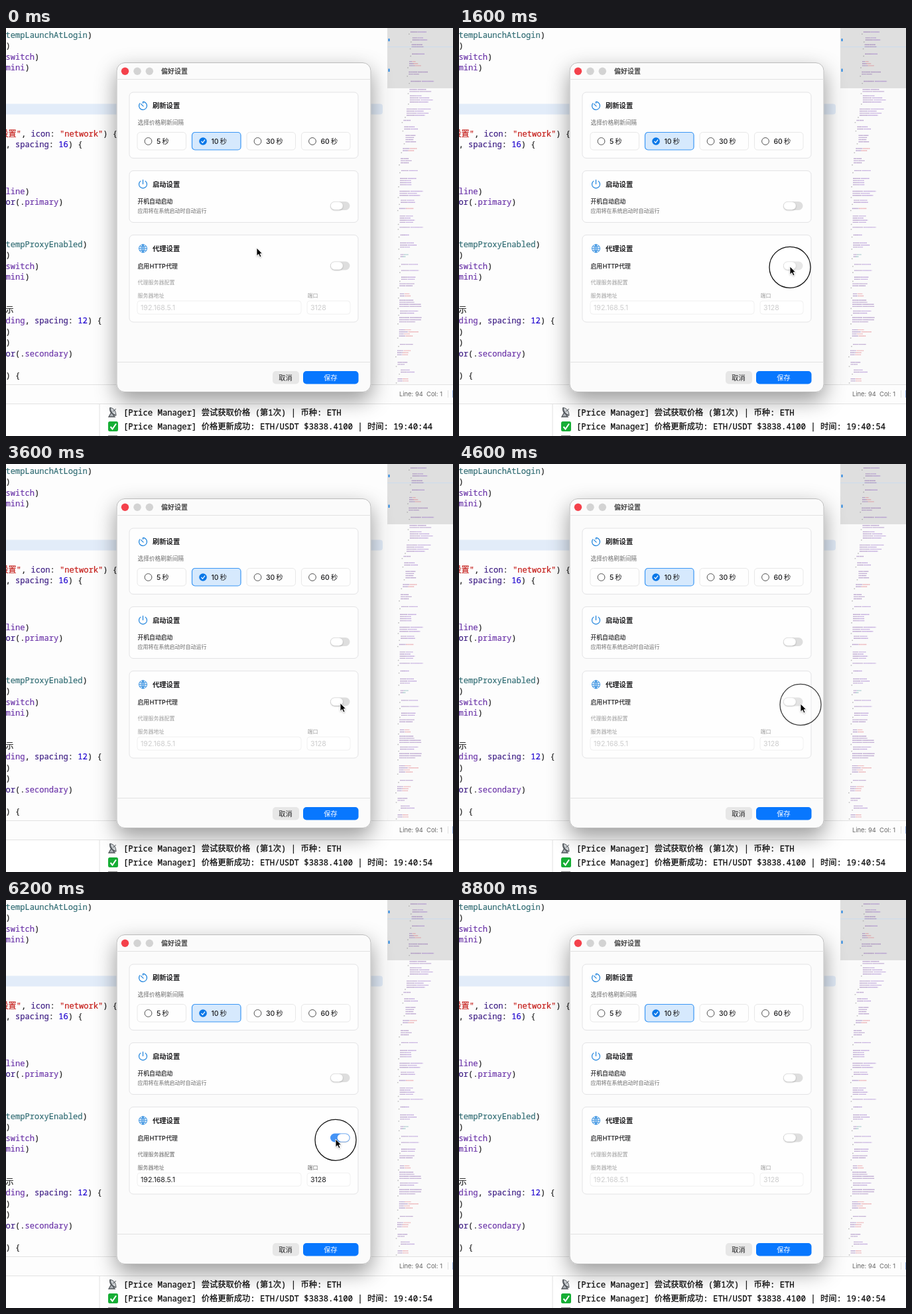
An HTML page for the animation above (8900 ms loop, 674 by 616 pixels).

```html
<!DOCTYPE html>
<html lang="zh-CN">
<head>
<meta charset="utf-8">
<style>
  html, body { margin: 0; width: 100%; height: 100%; overflow: hidden; background: #fff; }
  svg { display: block; width: 674px; height: 616px; }
  text { font-family: Inter, "Noto Sans CJK SC", "Noto Sans CJK", sans-serif; white-space: pre; fill: #1d1d1f; }
  .code text, .code tspan, .log text { fill: currentColor; stroke: currentColor; stroke-width: .2; }
  .code text, .log text { font-family: "Noto Sans Mono", "Noto Sans CJK SC", "DejaVu Sans Mono", monospace; }
  .code text { font-size: 12.1px; color: #222; }
  .log text { font-size: 12.28px; font-weight: 500; color: #111; stroke-width: .3; }
  .purple { color: #6c36a9; } .indigo { color: #3d1d84; } .teal { color: #326d74; }
  .red { color: #c41a16; } .blue { color: #1c00cf; }
  .rule { stroke: #e2e2e2; }
  .card { fill: #fefefe; stroke: #e3e3e5; }
  .field { fill: #fff; stroke: #f0f0f0; }
  .option { fill: #fefefe; stroke: #e8e8e8; }
  .option.on { fill: #d6e9fd; stroke: #3a97f5; stroke-width: 1.2; }
  .radio { fill: none; stroke: #555; }
  .icon { fill: none; stroke: #167fdc; stroke-linecap: round; }
  .title { font-size: 10.3px; font-weight: 700; }
  .choice { font-size: 10.5px; font-weight: 500; }
  .button { font-size: 10.2px; font-weight: 500; text-anchor: middle; }
  .label { font-size: 8.8px; font-weight: 500; stroke: #1d1d1f; stroke-width: .15; }
  .note { font-size: 8px; fill: #6b6b6b; }
  .value { font-size: 10.6px; }
</style>
</head>
<body>
<svg viewBox="0 0 674 616" xmlns="http://www.w3.org/2000/svg">
  <defs>
    <filter id="shadow" x="-25%" y="-20%" width="150%" height="145%">
      <feDropShadow dx="0" dy="12" stdDeviation="16" flood-opacity=".4"/>
    </filter>
    <filter id="soft" x="-50%" y="-50%" width="200%" height="200%">
      <feDropShadow dx="0" dy=".8" stdDeviation=".8" flood-opacity=".3"/>
    </filter>
  </defs>

  <!-- Editor -->
  <rect width="674" height="616" fill="#fdfdfd"/>
  <rect x="-8" y="114.5" width="576" height="16" rx="4" fill="#e2ecf9"/>
  <g class="code" id="code"></g>
  <rect x="574" width="100" height="538" fill="#fafafa"/>
  <rect x="575" width="99" height="91" fill="#dfdfdf"/>
  <path d="M575 28.5H674" stroke="#cbdcec"/>
  <path d="M577.5 16v4M577.5 61.5v4.5" stroke="#2486e4" stroke-width="2"/>
  <g id="minimap" stroke-width="1.4" stroke-dasharray="1.6 .6" opacity=".55"></g>

  <!-- Status bar and console -->
  <rect y="568" width="674" height="48" fill="#fff"/>
  <path class="rule" d="M0 538.5H674M0 567.5H674M141 568V616M666.5 547v11"/>
  <path d="M673.5 547v11" stroke="#9eb9e6"/>
  <text x="593" y="556" style="font-size:9.4px;fill:#666">Line: 94  Col: 1</text>
  <g class="log">
    <path d="M157 573q-2 9 9 12M155 587l4-7 5 7z" fill="#aeb3b8" stroke="#50555a" stroke-width="1.3"/>
    <path d="M157 573q9 2 9 12q-8-3-9-12M161 579l5-4" fill="#d1d5d8" stroke="#50555a"/>
    <text x="177" y="584.5">[Price Manager] 尝试获取价格 (第1次) | 币种: ETH</text>
    <rect x="154" y="594" width="15" height="15" rx="2.5" fill="#16ae35"/>
    <path d="M157.5 602l3 3.5 5.5-8" fill="none" stroke="#fff" stroke-width="2"/>
    <text x="177" y="606">[Price Manager] 价格更新成功: ETH/USDT $3838.4100 | 时间: <tspan id="stamp"></tspan></text>
    <rect x="154" y="615" width="14" height="1" fill="#888"/>
  </g>

  <!-- Preferences window -->
  <rect x="167" y="52.5" width="383" height="497" rx="12" fill="#fbfbfb" stroke="#bcbcbc" filter="url(#shadow)"/>
  <path class="rule" d="M167 77.5H550M167 504.5H550"/>
  <circle cx="179.5" cy="65.3" r="5.7" fill="#f4414b"/>
  <circle cx="198" cy="65.3" r="5.7" fill="#d3d3d3"/>
  <circle cx="216.3" cy="65.3" r="5.7" fill="#d3d3d3"/>
  <text class="title" x="234" y="69" style="font-size:10px;fill:#444">偏好设置</text>
  <g id="sections"></g>

  <text class="note" x="198.5" y="146" style="font-size:8.7px">选择价格刷新间隔</text>
  <g id="options"></g>

  <text class="label" x="198.5" y="265">开机自动启动</text>
  <text class="note" x="198.5" y="278.5">应用将在系统启动时自动运行</text>
  <g id="launchSwitch" transform="translate(489 262)"></g>

  <text class="label" x="198.5" y="362.5">启用&#8202;HTTP&#8202;代理</text>
  <g id="proxySwitch" transform="translate(489 352.5)"></g>
  <g id="proxy">
    <text class="note" x="198.5" y="386.5">代理服务器配置</text>
    <text class="note" x="198.5" y="406.5">服务器地址</text>
    <text class="note" x="454.5" y="406.5">端口</text>
  </g>
  <rect class="field" x="198" y="412" width="247" height="20" rx="4"/>
  <rect class="field" x="454" y="412" width="65" height="20" rx="4"/>
  <g id="values">
    <text class="value" x="203" y="425.8">192.168.5.1</text>
    <text class="value" x="459" y="425.8">3128</text>
  </g>

  <rect x="402" y="518" width="40" height="19.5" rx="5" fill="#e7e7e7"/>
  <text class="button" x="421.5" y="531.5">取消</text>
  <rect x="448" y="518" width="83.5" height="19.5" rx="5" fill="#0877fe"/>
  <text class="button" x="489.5" y="531.5" style="fill:#fff">保存</text>

  <!-- Pointer -->
  <g id="pointer">
    <circle id="ring" cy="1.3" r="31" fill="#fff" fill-opacity=".25" stroke="#111" stroke-width="1.3"/>
    <path d="M0 0V12.2L2.9 9.6 4.9 14 7 13 5.1 8.8H8.6Z" stroke="#fff" stroke-width=".9" filter="url(#soft)"/>
  </g>
</svg>
<script>
const $ = id => document.getElementById(id);
const clamp = v => Math.min(1, Math.max(0, v));
const ease = v => { v = clamp(v); return v * v * (3 - 2 * v); };
const mix = (a, b, k) => a + (b - a) * k;

// Code paragraphs keyed by first baseline; inside a line, "colour~word" tints the word
const paragraphs = {
  15: "teal~tempLaunchAtLogin)\n)\npurple~switch)\npurple~mini)",
  164: "red~设置\", indigo~icon: red~\"network\") {\n, indigo~spacing: blue~16) {",
  251: "purple~line)\nindigo~or(.purple~primary)",
  331: "teal~tempProxyEnabled)\n)\npurple~switch)\npurple~mini)",
  430: "示\npurple~ding, indigo~spacing: blue~12) {\n)\n)\nindigo~or(.purple~secondary)",
  529: ") {"
};
const tint = line => line.replace(/([a-z]+)~([\w"\u4e00-\u9fff]+)/g, '<tspan class="$1">$2</tspan>');
$("code").innerHTML = Object.entries(paragraphs).map(([top, body]) =>
  body.split("\n").map((line, i) =>
    `<text x="${line.includes("设") ? -8.5 : -.5}" y="${+top + i * 16.4}">${tint(line)}</text>`).join("")
).join("");

// Minimap: short paragraphs of tiny lines whose indent settles towards the left
function minimap() {
  let seed = 11, marks = "";
  const random = () => (seed = seed * 16807 % 2147483647) / 2147483647;
  const pick = list => list[Math.floor(random() * list.length)];
  const dash = (x, y, w, ink) => marks += `<path d="M${x} ${y}h${w}" stroke="${ink}"/>`;
  const pitch = 3.15;
  for (let y = 6; y < 535; y += pitch * (1 + 2 * random())) {
    const indent = 590 + 20 * Math.exp(-((y / 160) ** 2)) + 6 * random();
    const widest = 14 + 26 * random();
    const accent = pick(["#8451be", "#8451be", "#dd6570", y > 240 && y < 350 ? "#4a9598" : "#75459f"]);
    for (let rows = 1 + Math.floor(4 * random()); rows > 0 && y < 535; rows--, y += pitch) {
      const w = widest * (.5 + .5 * random());
      dash(indent, y, w * .45, "#75459f");
      dash(indent + w * .48, y, w * .52, accent);
    }
    dash(indent - 3, y, 2, "#888");
  }
  return marks;
}
$("minimap").innerHTML = minimap();

const sections = [
  { y: 97, height: 99.5, title: "刷新设置", icon: "M0-6A6 6 0 1 1-4.8-3.6M0-6v2.2M-3-2.8L.6.7", weight: 1.15 },
  { y: 215.5, height: 78, title: "启动设置", icon: "M-3.6-4.8A6 6 0 1 0 3.6-4.8M0-6.5v6", weight: 1.15 },
  { y: 312.5, height: 131.5, title: "代理设置", weight: .85,
    icon: "M-6 0a6 6 0 1 0 12 0a6 6 0 1 0-12 0H6M0-6V6M0-6q-5.500 6 0 12q5.500-6 0-12M-5-3.200Q0-1.800 5-3.200M-5 3.200Q0 1.800 5 3.200" }
];
$("sections").innerHTML = sections.map(s => `<g transform="translate(186 ${s.y})">
  <rect class="card" width="345" height="${s.height}" rx="6"/>
  <path class="icon" transform="translate(20.5 20.4)" d="${s.icon}" stroke-width="${s.weight}"/>
  <text class="title" x="35" y="24.3">${s.title}</text></g>`).join("");

$("options").innerHTML = [5, 10, 30, 60].map((seconds, i) => {
  const on = seconds === 10;
  const mark = on
    ? '<circle cx="16.5" cy="13.5" r="5.8" fill="#0877e8"/><path d="M14 13.5l2 2.3 3.5-4.6" fill="none" stroke="#fff" stroke-width="1.2"/>'
    : '<circle class="radio" cx="16.5" cy="13.5" r="5.4"/>';
  return `<g transform="translate(${198 + i * 82.5} 157.5)">
    <rect class="option ${on ? "on" : ""}" width="73.5" height="26.5" rx="4.5"/>${mark}
    <text class="choice" x="29" y="17.3">${seconds}\u2009秒</text></g>`;
}).join("");

function drawSwitch(id, on) {
  const track = [[222, 7], [222, 112], [222, 242]].map(([a, b]) => mix(a, b, on));
  $(id).innerHTML = `<rect width="29.5" height="13" rx="6.5" fill="rgb(${track})"/>
    <rect x="${mix(.8, 10.7, on)}" y=".8" width="18" height="11.4" rx="5.7" fill="#fff" filter="url(#soft)"/>`;
}
drawSwitch("launchSwitch", 0);

const duration = 8900;
const clicks = [0, 1, 2, 3].map(i => 1600 + i * 1550);
const glides = [
  { from: 350, to: 1400, x: 499, y: 360 },
  { from: 1700, to: 2300, x: 504, y: 361 },
  { from: 3700, to: 4600, x: 515, y: 362 },
  { from: 5500, to: 6150, x: 497, y: 361 }
];

function pointerAt(t) {
  return glides.reduce(([x, y], g) => {
    const k = ease((t - g.from) / (g.to - g.from));
    return [mix(x, g.x, k), mix(y, g.y, k)];
  }, [378, 332]);
}

function draw(now) {
  const t = now % duration;
  // Every click flips the switch shortly after the press
  const on = clicks.reduce((v, c, i) => mix(v, (i + 1) % 2, ease((t - c - 130) / 180)), 0);
  const ring = Math.max(...clicks.map(c => Math.min(clamp((t - c + 180) / 100), clamp((c + 210 - t) / 120))));

  drawSwitch("proxySwitch", on);
  $("proxy").setAttribute("opacity", mix(.65, 1, on));
  $("values").setAttribute("opacity", mix(.22, 1, on));
  $("pointer").setAttribute("transform", `translate(${pointerAt(t)})`);
  $("pointer").setAttribute("opacity", clamp((8100 - t) / 250));
  $("ring").setAttribute("opacity", ring);
  $("stamp").textContent = t < 800 ? "19:40:44" : "19:40:54";
}

const start = performance.now();
function tick() {
  draw(performance.now() - start);
  requestAnimationFrame(tick);
}
tick();
</script>
</body>
</html>
```
